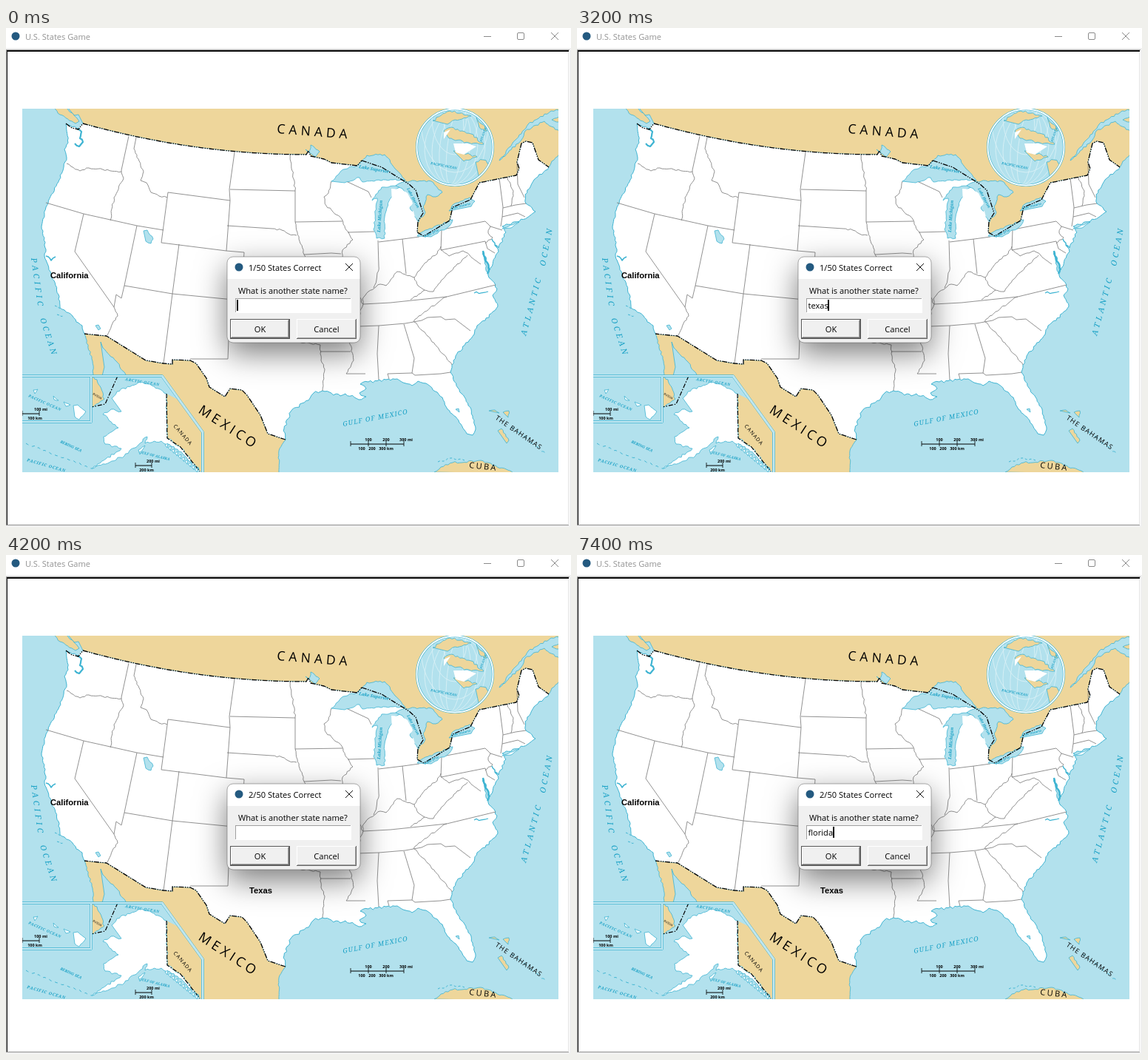
Recreate the animation shown at these times as an HTML page with a canvas. Size 764 px wide and 674 px high, loop 8000 ms.

```html
<!DOCTYPE html>
<html lang="en">
<head>
<meta charset="utf-8">
<title>U.S. States Game</title>
<style>
html, body { margin: 0; width: 100%; height: 100%; overflow: hidden; background: #fff; }
canvas { display: block; }
</style>
</head>
<body>
<canvas id="stage" width="764" height="674"></canvas>
<script>
const W = 764, H = 674, LOOP = 8000;
const SEA = '#b2e1ed', LAND = '#eed69b', COAST = '#3fb4d2', TEAL = '#159fc4';
const UI = '"Open Sans", "Noto Sans", sans-serif';
const ARIAL = '"Liberation Sans", Arial, sans-serif';
const SERIF = '"Noto Serif", "DejaVu Serif", serif';
const SMALL = '11.1px ' + UI;

let seed = 11;
const rand = () => (seed = (seed * 16807) % 2147483647) / 2147483647;
const pts = s => s.trim().split(/\s+/).map(p => p.split(',').map(Number));

// Adds small bays and bends between the given points.
function rough(s, amp) {
  const list = pts(s), out = [];
  list.forEach((p, i) => {
    out.push(p);
    const q = list[i + 1];
    if (!q) return;
    const dx = q[0] - p[0], dy = q[1] - p[1], len = Math.hypot(dx, dy), n = Math.floor(len / 3);
    for (let k = 1; k < n; k++) {
      const d = (rand() - 0.5) * 2 * amp / len;
      out.push([p[0] + dx * k / n - dy * d, p[1] + dy * k / n + dx * d]);
    }
  });
  return out;
}

function trace(g, list, closed) {
  g.beginPath();
  list.forEach(p => g.lineTo(p[0], p[1]));
  if (closed) g.closePath();
}
function area(g, list, fill, edge) {
  trace(g, list, true);
  g.fillStyle = fill; g.fill();
  if (edge) { g.strokeStyle = edge; g.lineWidth = 0.8; g.stroke(); }
}
function line(g, list, color, width, dash = []) {
  trace(g, list);
  g.strokeStyle = color; g.lineWidth = width;
  g.setLineDash(dash); g.stroke(); g.setLineDash([]);
}
function text(g, str, x, y, font, color, align = 'left') {
  g.font = font; g.fillStyle = color; g.textAlign = align;
  g.fillText(str, x, y);
}
function label(g, str, x, y, deg, font, color, gap = 0) {
  g.save();
  g.translate(x, y); g.rotate(deg * Math.PI / 180);
  g.letterSpacing = gap + 'px';
  text(g, str, 0, 0, font, color);
  g.restore();
}
function box(g, x, y, w, h, color) { g.fillStyle = color; g.fillRect(x, y, w, h); }
function layer(paint) {
  const c = document.createElement('canvas');
  c.width = W; c.height = H;
  paint(c.getContext('2d'));
  return c;
}

const parallel = Array.from({ length: 21 }, (_, i) => [104 + i * 15.1, 171 - 42 * (1 - i / 20) ** 2]);
const north = [...parallel, ...pts('409,166 412,173 430,177 440,182 475,186 481,179')];
const lakeLine = pts('481,179 508,188 545,211 554,219 564,250 557,261 556,276 565,281 600,260 604,242 628,232');
const northEast = pts('628,232 640,209 690,199 694,190 691,181 697,156 703,153 712,155 720,178 734,188');
const east = rough(`734,188 714,205 702,225 703,237 716,248 705,256 671,268 676,276 666,297 661,293 666,302
  654,327 645,302 652,334 664,352 658,361 665,376 648,395 637,402 633,414 608,443 601,465`, 1.4);
const florida = rough(`601,465 611,486 629,515 635,542 631,550 623,548 612,530 597,515 590,499
  568,480 557,477 549,483 537,479 529,474 514,475`, 1.1);
const gulf = rough(`514,475 490,478 479,481 487,487 478,493 487,498 477,502 459,494 452,497 428,490
  416,493 411,500 385,518 376,541 378,556`, 1.8);
const south = pts(`378,556 354,548 344,523 326,496 319,489 303,487 296,498 275,485 271,473 257,453 249,449
  225,448 225,454 213,453 189,449 136,416 106,413`);
const west = rough(`106,413 103,402 95,397 90,389 73,378 71,360 60,329 52,308 54,299 48,268
  54,242 72,205 82,175 79,164 84,155 81,130 98,136`, 1);

function drawStates(g) {
  const straight = s => line(g, pts(s), '#777', 0.8);
  const river = s => line(g, rough(s, 1.1), '#777', 0.8);
  river('82,183 88,187 100,193 112,189 156,194');
  straight('166,146 156,192');
  river('156,192 159,203 146,229 141,260');
  straight('176,148 173,163');
  river('173,163 186,194 182,206 190,209 196,222 207,227 218,229');
  straight('219,222 210,290 298,301 303,233 219,222');
  straight('54,236 105,251 177,267 213,273');
  straight('105,251 93,302 146,377');
  river('146,377 151,389 144,399 137,415');
  straight('177,267 160,348 156,365 149,360 146,377');
  straight('160,348 225,359 318,368 411,371');
  straight('234,292 225,359 213,453');
  straight('298,301 322,303 318,368');
  straight('321,318 390,320');
  straight('309,168 302,218 303,233');
  straight('303,218 391,220');
  straight('299,267 360,271');
  river('360,271 373,273 382,278 393,280');
  river('384,171 389,204 391,219');
  straight('391,219 391,262 455,261');
  river('391,262 394,276 403,306 411,318');
  straight('411,318 411,368 414,378 418,423');
  river('440,207 436,223 430,228 433,240 454,258 456,265 469,286 455,300 455,311 463,327 470,350 483,373');
  straight('403,306 440,304 453,305');
  straight('414,378 471,376 469,383 479,383');
  straight('303,367 300,447 249,447');
  straight('302,375 344,378 343,409');
  river('343,409 354,416 390,423 425,428 426,449 431,461 428,490');
  straight('425,437 466,437');
  river('483,373 477,389 464,420 470,449 460,467');
  straight('460,467 486,467');
  straight('476,403 504,402 540,399 562,395');
  straight('504,402 502,440 504,475');
  straight('538,400 552,446 549,466');
  straight('518,474 516,467 549,466 553,469 588,467 601,465');
  river('552,397 570,416 585,433 603,455');
  straight('562,395 570,391 588,390 594,394 607,393 628,409');
  river('551,397 558,389 584,371 596,363');
  straight('483,373 520,371 596,363 662,347');
  river('483,373 482,366 490,356 506,346 514,348 529,329 540,333 552,337 563,322 571,313 583,305 588,295');
  river('552,337 557,348 566,354 547,367');
  river('566,354 578,356 595,334 624,307');
  river('588,299 599,308 618,301 627,307 642,319');
  straight('462,276 498,275');
  straight('503,287 504,322');
  river('504,322 501,340 497,351');
  straight('536,285 541,332');
  straight('504,289 537,285 559,282');
  straight('589,273 588,300 648,288 651,298 661,304');
  straight('590,272 648,261 655,268 671,273');
  river('655,268 652,277 658,283 648,291');
  straight('667,203 672,242 671,255 669,268');
  river('678,202 686,220 683,240');
  straight('691,182 692,211 701,229');
  straight('672,243 689,239 703,237');
  straight('671,255 692,250 702,255');
  straight('460,207 490,221 494,229');
}

function drawLakes(g) {
  const lake = s => area(g, rough(s, 1.2), SEA, COAST);
  lake('440,207 456,191 474,186 488,172 512,171 519,178 526,190 540,206 523,205 482,208 478,202 458,209');
  lake('538,212 508,215 495,233 502,230 497,272 501,284 512,284 512,255 515,243 525,219');
  lake('527,213 540,207 575,207 590,222 581,228 570,225 564,241 567,249 558,262 546,243 550,235 536,217');
  lake('556,281 562,276 604,259 600,267 575,282');
  lake('599,247 603,240 627,229 634,234 629,241');
  lake('405,164 409,168 412,158 424,167 418,174');
  lake('186,274 191,273 199,285 196,291 189,288');
  area(g, rough('521,217 531,217 543,223 550,237 540,251 551,247 555,277 514,286 513,256 522,237', 0.8), '#fff');
}

function drawGlobe(g) {
  const x = 607, y = 161, r = 51;
  g.save();
  g.beginPath(); g.arc(x, y, r, 0, 7);
  g.fillStyle = SEA; g.fill(); g.clip();
  g.strokeStyle = '#def2f7'; g.lineWidth = 0.8;
  for (let i = 1; i < 5; i++) {
    g.beginPath(); g.ellipse(x, y, r * i / 5, r, 0.12, 0, 7); g.stroke();
    g.beginPath(); g.ellipse(x, y - 38, r * i / 3.3, 24 * i, 0, 0, 7); g.stroke();
  }
  const isle = s => area(g, rough(s, 1.5), LAND, COAST);
  isle('577,125 600,112 629,119 607,124 597,130');
  isle('592,139 602,134 629,143 646,157 626,155 599,149');
  isle('605,166 628,171 637,174 619,180');
  isle('635,181 645,178 655,184 640,204');
  isle('636,121 651,139 640,134');
  area(g, pts('605,156 624,156 636,160 619,171 608,168'), '#fff');
  area(g, pts('592,141 601,137 592,150'), '#fff');
  label(g, 'PACIFIC OCEAN', 574, 184, 11, 'italic bold 4.5px ' + SERIF, TEAL);
  label(g, 'ATLANTIC', 643, 154, -70, 'italic bold 4px ' + SERIF, TEAL);
  g.restore();
  g.lineWidth = 3; g.strokeStyle = COAST;
  g.beginPath(); g.arc(x, y, r + 0.5, 0, 7); g.stroke();
  g.lineWidth = 1.8; g.strokeStyle = '#fff'; g.stroke();
}

function drawInsets(g) {
  const isle = (s, amp = 0.6) => area(g, rough(s, amp), '#fff', COAST);
  const border = s => line(g, pts(s), '#000', 1.2, [6, 2, 1.5, 2]);
  area(g, pts('22,470 210,470 265,545 265,600 22,600'), SEA);
  area(g, pts('217,494 233,502 264,545 264,600 245,578 218,554'), LAND);
  isle(`143,500 150,491 182,478 200,484 217,494 218,553 238,568 261,597 232,569 210,558 188,561 191,552
    160,578 117,595 156,568 134,562 132,552 152,540 131,522 142,515 156,518`, 1.4);
  border('217,494 218,554 236,566 262,599');
  for (let i = 0; i < 10; i++) {
    const x = 215 + i * 4.5, y = 563 + i * 3.7;
    area(g, [[x, y], [x + 4, y - 2], [x + 3, y + 4]], '#fff', COAST);
  }
  isle('179,570 188,564 181,576');
  line(g, rough('27,561 70,578 117,595', 1.5), COAST, 1, [4, 5]);
  area(g, rough('115,470 123,475 133,501 115,513', 1.2), LAND, COAST);
  border('151,470 134,508 115,512');

  area(g, pts('22,470 114,470 114,532 22,532'), SEA);
  isle('91,510 97,509 108,518 99,529 93,525');
  isle('78,505 87,509 81,511');
  isle('64,497 71,503 65,502');
  isle('37,489 43,488 39,494');
  for (const [c, w] of [[COAST, 3.6], ['#fff', 2.2], [COAST, 0.6]]) {
    line(g, pts('22,470 211,470 266,546 266,600'), c, w);
    line(g, pts('115,470 115,532 22,532'), c, w);
  }
}

function scale(g, x, y, step, n, mi, km) {
  const tiny = 'bold 5.5px ' + UI;
  line(g, [[x, y], [x + step * n, y]], '#000', 1);
  for (let i = 0; i <= n; i++) line(g, [[x + i * step, y - 4], [x + i * step, y + 3]], '#000', 0.8);
  mi.forEach(([s, a]) => text(g, s, a, y - 4, tiny, '#000', 'center'));
  km.forEach(([s, a]) => text(g, s, a, y + 8, tiny, '#000', 'center'));
}

function drawLabels(g) {
  const sea = (s, x, y, deg, size, gap) => label(g, s, x, y, deg, `italic ${size}px ${SERIF}`, TEAL, gap);
  const land = (s, x, y, deg, size, gap) => label(g, s, x, y, deg, `${size}px ${UI}`, '#000', gap);
  const small = (s, x, y, deg, size, gap) => label(g, s, x, y, deg, `italic bold ${size}px ${SERIF}`, TEAL, gap);
  land('CANADA', 366, 142, 4.5, 17.5, 5.1);
  land('MEXICO', 259, 519, 33, 18, 4.4);
  land('CANADA', 226, 538, 49, 7, 1.2);
  land('THE BAHAMAS', 661, 528, 34.5, 9, 1.2);
  land('CUBA', 626, 594, 6, 11, 2.4);
  land('RUSSIA', 117, 495, 30, 4);
  sea('PACIFIC', 34, 311, 82, 10.5, 4.2);
  sea('OCEAN', 46, 393, 72, 10.5, 3.7);
  sea('ATLANTIC', 703, 416, -75, 10.5, 3.9);
  sea('OCEAN', 729, 322, -79, 10.5, 3.6);
  sea('GULF OF MEXICO', 456, 538, -11, 8.8, 1.1);
  small('Lake Superior', 477, 189, 10, 5.8);
  small('Lake Michigan', 506, 276, -86, 5.8);
  small('Lake Huron', 542, 217, 62, 5);
  small('Lake Erie', 566, 283, -25, 4.5);
  small('Lake Ontario', 602, 245, -14, 4);
  small('ARCTIC OCEAN', 161, 476, 9, 5, 0.7);
  small('PACIFIC OCEAN', 30, 498, 24, 5, 0.6);
  small('BERING SEA', 73, 560, 24, 5);
  small('GULF OF ALASKA', 180, 574, 14, 4.7);
  small('PACIFIC OCEAN', 28, 585, 16, 5.5, 0.8);
  scale(g, 466, 562, 24, 3, [['100', 490], ['200', 514], ['300 mi', 541]], [['100', 481], ['200', 495], ['300 km', 514]]);
  scale(g, 175, 591, 22, 1, [['200 mi', 199]], [['200 km', 190]]);
  scale(g, 22, 521, 23, 1, [['100 mi', 47]], [['100 km', 39]]);
}

function drawMap(g) {
  const shore = (s, width, dash) => line(g, rough(s, 1.4), COAST, width, dash);
  const land = (s, amp = 1) => area(g, rough(s, amp), LAND, COAST);
  g.save();
  g.beginPath(); g.rect(22, 109, 725, 491); g.clip();
  box(g, 22, 109, 725, 491, SEA);
  area(g, [...pts('84,108 92,118 98,117'), ...north, ...lakeLine, ...northEast,
    ...rough('734,188 738,180 748,170', 2), [748, 108]], LAND, COAST);
  land('65,108 73,117 94,129 99,126 92,118 82,108');
  area(g, rough('748,111 737,112 706,130 667,179 697,151 702,139 728,126 748,140', 1.2), SEA, COAST);
  land('748,120 738,124 748,127');

  area(g, [...south, ...rough('106,413 117,450 118,470', 1), ...pts('130,470 133,458 128,424'),
    ...rough('131,432 149,450 166,475', 1), ...pts('200,520 264,602 369,602'),
    ...rough('369,600 369,571 375,560', 0.8)], LAND, COAST);

  area(g, [...north, ...lakeLine, ...northEast, ...east, ...florida, ...gulf, ...south, ...west], '#fff');
  g.lineJoin = 'round';
  [east, florida, gulf, west].forEach(c => line(g, c, COAST, 1));
  drawStates(g);
  drawLakes(g);

  // Sounds, bays and small islands.
  shore('96,136 102,140 100,149 104,154 99,160 93,156', 2.2);
  shore('645,301 653,326 651,332', 2.4);
  shore('664,296 657,285', 1.5);
  shore('54,308 61,314 67,309', 1.6);
  shore('652,356 633,358', 1.2);
  shore('69,387 78,389', 1, [3, 2]);
  shore('66,375 73,379', 1, [3, 2]);
  area(g, rough('671,271 694,262 683,270', 0.6), '#fff', COAST);
  area(g, pts('121,402 125,401 128,406 125,408'), SEA, COAST);
  area(g, pts('608,515 612,514 613,519'), SEA, COAST);

  const dash = [7, 1.5, 1.5, 1.5, 1.5, 1.5];
  const strait = pts('81,129 89,135 98,137 104,129');
  [strait, north, lakeLine, northEast, south].forEach(b => line(g, b, '#000', 1.3, dash));

  land('579,600 588,593 604,587 642,584 690,602', 1.4);
  shore('584,586 601,581 620,584', 1, [3, 3]);
  land('665,544 670,541 680,557 677,561');
  land('653,517 661,516 667,520');
  land('672,519 680,517 679,526');
  shore('683,539 704,554 729,575', 0.8, [5, 6]);

  drawInsets(g);
  drawGlobe(g);
  drawLabels(g);
  g.restore();
}

function cross(g, x, y, r, color) {
  line(g, [[x - r, y - r], [x + r, y + r]], color, 1);
  line(g, [[x - r, y + r], [x + r, y - r]], color, 1);
}
function dot(g, x, y) {
  g.beginPath(); g.arc(x, y, 5.5, 0, 7); g.fillStyle = '#245a80'; g.fill();
}

const scene = layer(g => {
  box(g, 0, 0, W, H, '#fff');
  dot(g, 13, 11);
  text(g, 'U.S. States Game', 26, 16, SMALL, '#949494');
  box(g, 646, 11, 10, 1, '#8a8a8a');
  g.strokeStyle = '#8a8a8a'; g.lineWidth = 1;
  g.beginPath(); g.roundRect(691.5, 6.5, 9, 9, 1.5); g.stroke();
  cross(g, 742, 11, 5, '#8a8a8a');
  box(g, 0, 27, W, H - 27, '#f0f0f0');
  box(g, 0, 29, 762, 643, '#a0a0a0');
  box(g, 1, 30, 760, 641, '#101010');
  box(g, 2, 32, 759, 639, '#e3e3e3');
  box(g, 2, 32, 758, 638, '#fff');
  box(g, 761, 30, 1, 642, '#fff');
  drawMap(g);
  text(g, 'California', 60, 338, 'bold 11.2px ' + ARIAL, '#000');
});

function button(g, x, y, w, h, name, active) {
  box(g, x, y, w, h, active ? '#555' : '#696969');
  if (active) { x++; y++; w -= 2; h -= 2; box(g, x, y, w, h, '#696969'); }
  box(g, x, y, w - 1, h - 1, '#fff');
  box(g, x + 1, y + 1, w - 2, h - 2, '#a0a0a0');
  box(g, x + 1, y + 1, w - 3, h - 3, '#f0f0f0');
  text(g, name, x + w / 2, 411, SMALL, '#000', 'center');
}

const makeDialog = score => layer(g => {
  const body = () => { g.beginPath(); g.roundRect(299, 309, 180, 116, 8); };
  g.save();
  g.shadowColor = 'rgba(0,0,0,.52)'; g.shadowBlur = 42; g.shadowOffsetY = 14;
  g.fillStyle = '#f0f0f0'; body(); g.fill();
  g.restore();
  g.save();
  body(); g.clip();
  box(g, 299, 309, 180, 30, '#fff');
  g.restore();
  g.strokeStyle = 'rgba(90,90,90,.5)'; g.lineWidth = 1; body(); g.stroke();
  dot(g, 315, 323);
  text(g, `${score}/50 States Correct`, 328, 328, SMALL, '#000');
  cross(g, 464, 323, 5, '#111');
  text(g, 'What is another state name?', 314, 359, SMALL, '#000');
  box(g, 310, 365, 157, 20, '#fff');
  box(g, 310, 365, 156, 19, '#a0a0a0');
  box(g, 311, 366, 155, 18, '#fff');
  button(g, 303, 393, 81, 27, 'OK', true);
  button(g, 393, 393, 81, 27, 'Cancel', false);
});
const dialogs = [makeDialog(1), makeDialog(2)];

// Moments at which the next letter appears.
const entries = [
  { word: 'texas', keys: [1400, 1600, 1800, 2000, 2400] },
  { word: 'florida', keys: [5200, 5600, 6000, 6200, 6400, 6800, 7400] }
];
const hidden = [[600, 1200], [3000, 3200], [4200, 4600], [5000, 5200]];

const ctx = document.getElementById('stage').getContext('2d');

function frame(now) {
  const t = now % LOOP, second = t >= 3600;
  const { word, keys } = entries[+second];
  const typed = word.slice(0, keys.filter(k => k <= t).length);
  ctx.drawImage(scene, 0, 0);
  if (second) text(ctx, 'Texas', 329, 457, 'bold 11.2px ' + ARIAL, '#000');
  ctx.save();
  if (second && t < 3800) {
    ctx.globalAlpha = 0.4;
    ctx.translate(29.6, 30);
    ctx.scale(0.911, 0.911);
  }
  ctx.drawImage(dialogs[+second], 0, 0);
  text(ctx, typed, 312.5, 379, SMALL, '#000');
  if (!hidden.some(([a, b]) => t >= a && t < b))
    box(ctx, Math.round(312 + ctx.measureText(typed).width), 367, 2, 15, '#000');
  ctx.restore();
  requestAnimationFrame(frame);
}
requestAnimationFrame(frame);
</script>
</body>
</html>
```
